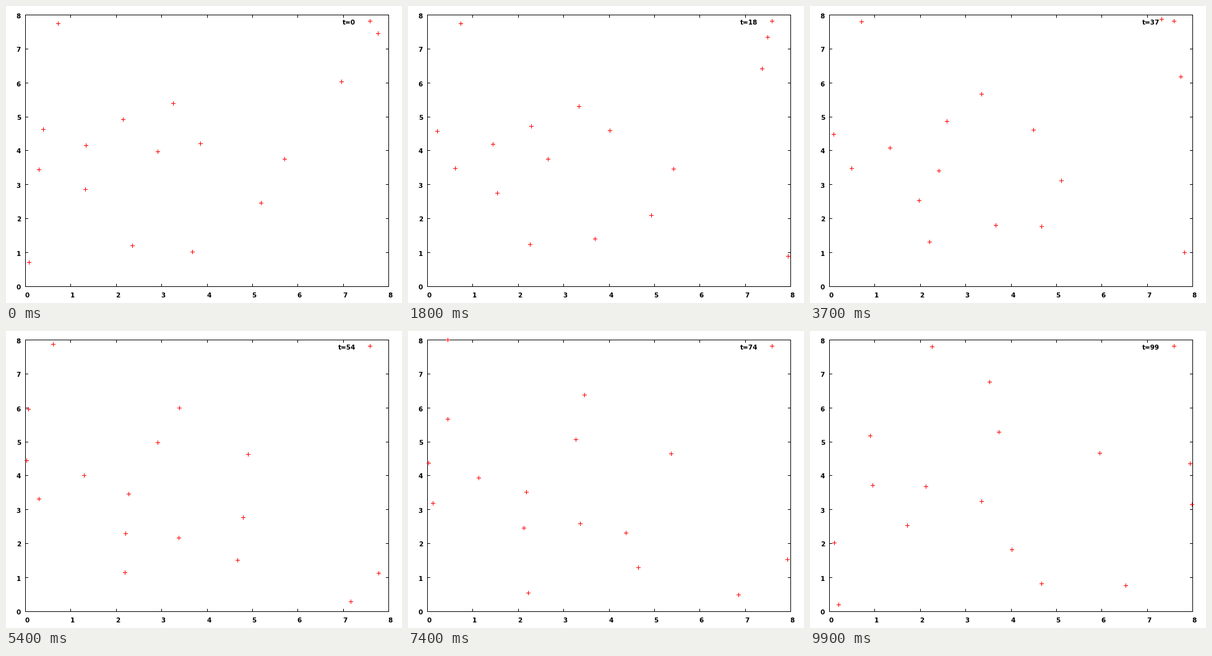
Animation of 640x480 px, one loop 10000 ms. Source, as a matplotlib script:

```python
import numpy as np
import matplotlib.pyplot as plt
from matplotlib.animation import FuncAnimation
from matplotlib.collections import LineCollection

W, H, DPI, FRAMES = 640, 480, 100, 100
LEFT, TOP, RIGHT, BOTTOM = 31, 14, 618, 453
BOX, N = 8, 16
PX = 72 / DPI
ORIGIN = np.array([LEFT, BOTTOM])
SCALE = np.array([RIGHT - LEFT, TOP - BOTTOM]) / BOX


def units(*points):
    return (np.array(points) - ORIGIN) / SCALE


# A gas in a periodic box: two moments fix its motion in both directions,
# and four later points settle how strong the collisions are.
T0, T1, T2 = 37, 54, 74
START = units((83, 25), (568, 21), (599, 114), (277, 142),
              (221, 186), (38, 207), (129, 229), (208, 266),
              (361, 200), (406, 282), (67, 262), (176, 314),
              (374, 356), (193, 381), (300, 354), (605, 398))
NEXT = units((76, 21), (557, 437), (36, 126), (280, 124),
             (245, 180), (33, 209), (126, 233), (198, 263),
             (391, 199), (383, 301), (53, 271), (193, 327),
             (374, 370), (192, 390), (279, 334), (602, 391))
BOUNCED = [7, 11, 12, 14]
LATER = units((191, 260), (187, 318), (372, 382), (278, 311))
LOG_G = np.log(24 * 0.013 ** 2)


def nearest(d):
    """Shortest displacement in the periodic box."""
    return d - BOX * np.round(d / BOX)


def force(q):
    """Lennard-Jones force on every particle, for a batch of states."""
    d = nearest(q[:, :, None] - q[:, None])
    r2 = np.maximum((d ** 2).sum(-1) + 1e3 * np.eye(N), 0.6)
    s = 1 / r2
    return ((2 * s ** 7 - s ** 4)[..., None] * d).sum(2)


def pack(q, v, log_g):
    return np.concatenate([q.ravel(), v.ravel(), [log_g]])


def simulate(params, steps):
    """Verlet integration of a batch of packed states."""
    q, v = params[:, :-1].reshape(-1, 2, N, 2).swapaxes(0, 1)
    g = np.exp(np.clip(params[:, -1], -9, -3))[:, None, None]
    old, path = q - v, [q]
    for _ in range(steps):
        q, old = 2 * q - old + g * force(q), q
        path.append(q)
    return np.stack(path, 1)


def misfit(params, end):
    path = simulate(params, end - T0)
    miss = [path[:, 0] - START, path[:, T1 - T0] - NEXT]
    if end == T2:
        miss.append(path[:, -1, BOUNCED] - LATER)
    miss = [nearest(m).reshape(len(params), -1) for m in miss]
    return np.hstack(miss + [0.01 * (params[:, -1:] - LOG_G)])


def fit():
    """Damped Gauss-Newton, first on the short span, then on the long one."""
    p = pack(START, nearest(NEXT - START) / (T1 - T0), LOG_G)
    eps = np.repeat([1e-6, 1e-7, 1e-5], [2 * N, 2 * N, 1])
    for end in (T1, T2):
        for _ in range(25):
            res = misfit(p + np.vstack([0 * eps, np.diag(eps)]), end)
            r, jac = res[0], (res[1:] - res[0]).T / eps
            a, b = jac.T @ jac, jac.T @ r
            damp = np.diag(a.diagonal() + 1e-9)
            tries = [p] + [p - np.linalg.solve(a + lam * damp, b)
                           for lam in 10.0 ** np.arange(-6, 4)]
            cost = (misfit(np.array(tries), end) ** 2).sum(1)
            best = int(np.argmin(cost))
            if cost[0] - cost[best] < 1e-9:
                break
            p = tries[best]
    return p


def trajectory():
    p = fit()
    ahead = simulate(p[None], FRAMES - 1 - T0)[0]
    back = pack(ahead[0], ahead[0] - ahead[1], p[-1])
    behind = simulate(back[None], T0)[0]
    return np.concatenate([behind[:0:-1], ahead]) % BOX


def pixels(q):
    return ORIGIN + np.sign(SCALE) * np.floor(np.abs(SCALE) * q + 0.5)


def crosses(points):
    segs = []
    for x, y in points:
        segs.append([(x - 3, y + 0.5), (x + 4, y + 0.5)])
        segs.append([(x + 0.5, y - 3), (x + 0.5, y + 4)])
    return segs


def label(x, y, s, ha):
    return ax.text(x, y, s, ha=ha, va="center_baseline", color="black",
                   family="DejaVu Sans", weight="bold", size=10.4 * PX)


def lines(segs, color, z):
    c = LineCollection(segs, colors=color, linewidths=PX, zorder=z)
    c.set_snap(False)
    ax.add_collection(c, autolim=False)
    return c


fig = plt.figure(figsize=(W / DPI, H / DPI), dpi=DPI, facecolor="white")
ax = fig.add_axes([0, 0, 1, 1])
ax.set_xlim(0, W)
ax.set_ylim(H, 0)
ax.axis("off")

frame = [[(LEFT, y + 0.5), (RIGHT + 1, y + 0.5)] for y in (TOP, BOTTOM)]
frame += [[(x + 0.5, TOP), (x + 0.5, BOTTOM + 1)] for x in (LEFT, RIGHT)]
for k in range(BOX + 1):
    x, y = pixels(k)
    frame += [[(x + 0.5, TOP), (x + 0.5, TOP + 5)],
              [(x + 0.5, BOTTOM - 4), (x + 0.5, BOTTOM + 1)],
              [(LEFT, y + 0.5), (LEFT + 5, y + 0.5)],
              [(RIGHT - 4, y + 0.5), (RIGHT + 1, y + 0.5)]]
    label(x + 3, 467, str(k), "center")
    label(24, y + 1.5, str(k), "right")
lines(frame, "black", 1)

clock = label(565, 25.5, "t=0", "right")
marks = lines([], "red", 3)
path = pixels(trajectory())


def update(i):
    clock.set_text(f"t={i}")
    marks.set_segments(crosses([(588, 24), *path[i]]))
    return clock, marks


anim = FuncAnimation(fig, update, frames=FRAMES, interval=100,
                     repeat=True, repeat_delay=0)
plt.show()
```
